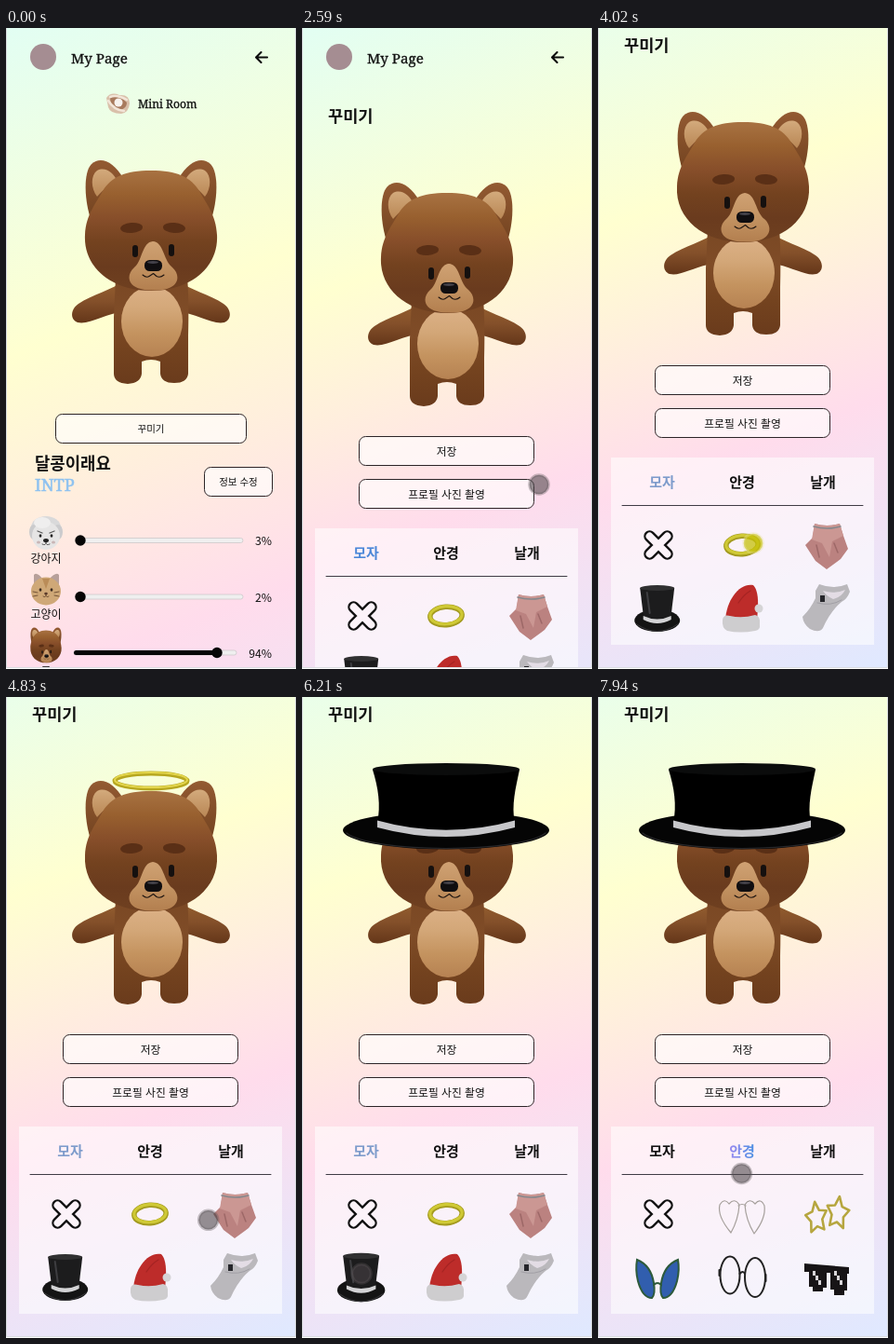
Animation of 312 by 688 pixels, one loop 8 s. Source, as an HTML page:

```html
<!DOCTYPE html>
<html lang="ko">
<head>
<meta charset="utf-8">
<title>My Page</title>
<style>
html, body { margin: 0; width: 100%; height: 100%; overflow: hidden; background: #fff; }
svg { display: block; }
text { font-family: 'Noto Sans CJK KR', 'Noto Sans CJK', 'Noto Sans KR', sans-serif; fill: #111; }
.slab { font-family: 'Noto Serif', serif; stroke: #111; stroke-width: .3; }
.slab.type { fill: #8ec2f0; stroke: #8ec2f0; stroke-width: .6; }
.mid { text-anchor: middle; }
.bold { font-weight: 700; }
.tab { font-weight: 700; text-anchor: middle; }
.btn { fill: #fff; fill-opacity: .65; stroke: #2c2427; }
.line { fill: none; stroke-linecap: round; stroke-linejoin: round; }
</style>
</head>
<body>
<svg id="stage" width="312" height="688" viewBox="0 0 312 688"></svg>
<script>
const LOOP = 8000;
const stage = document.getElementById('stage');

const txt = (x, y, size, s, cls = '', attrs = '') =>
  `<text x="${x}" y="${y}" font-size="${size}" class="${cls}" ${attrs}>${s}</text>`;
const path = (d, fill, attrs = '') => `<path d="${d}" fill="${fill}" ${attrs}/>`;
const line = (d, stroke, w, attrs = '') =>
  `<path class="line" d="${d}" stroke="${stroke}" stroke-width="${w}" ${attrs}/>`;
const oval = (x, y, rx, ry, fill, attrs = '') =>
  `<ellipse cx="${x}" cy="${y}" rx="${rx}" ry="${ry}" fill="${fill}" ${attrs}/>`;
const box = (x, y, w, h, r, attrs) =>
  `<rect x="${x}" y="${y}" width="${w}" height="${h}" rx="${r}" ${attrs}/>`;
const group = (x, y, body, id = '') => `<g ${id && `id="${id}"`} transform="translate(${x} ${y})">${body}</g>`;
const button = (x, y, w, h, s, size) =>
  box(x, y, w, h, 7, 'class="btn"') + txt(x + w / 2, y + h / 2 + size * .4, size, s, 'mid');

function gradient(id, stops, axis = 'x1="0" y1="0" x2="0" y2="1"') {
  const marks = stops.map((c, i) => `<stop offset="${i / (stops.length - 1)}" stop-color="${c}"/>`);
  return `<linearGradient id="${id}" ${axis}>${marks.join('')}</linearGradient>`;
}

// Page backdrop: the same four colours at 160 degrees, fitted to the page height.
function backdrop(id, h) {
  const a = Math.PI / 9, sx = Math.sin(a), sy = Math.cos(a), len = 312 * sx + h * sy;
  return gradient(id, ['#e2fef3', '#ffffd0', '#ffdcec', '#dfe9ff'],
    `gradientUnits="userSpaceOnUse" x1="0" y1="0" x2="${len * sx}" y2="${len * sy}"`);
}

const defs = `<defs>
  ${backdrop('bg1', 950)}${backdrop('bg2', 764)}
  ${gradient('head', ['#a87242', '#98602f', '#874e2a', '#73421f', '#6a3b1e', '#6f4020'])}
  ${gradient('ear', ['#935a32', '#71421f'])}
  ${gradient('inner', ['#d3aa7c', '#b98755'])}
  ${gradient('body', ['#7a4824', '#7f4c27', '#74431f', '#6a3b1c'])}
  ${gradient('arm', ['#96602f', '#84502a', '#643619'])}
  ${gradient('belly', ['#dcb187', '#d3a778', '#c4935f', '#b68252'])}
  ${gradient('muzzle', ['#cfa173', '#c39362', '#b37f4f'])}
  ${gradient('cloth', ['#efb0b0', '#e9a3a4', '#dc9193'])}
  ${gradient('back', ['#dc9292', '#cf8080', '#d58a8a'])}
  ${gradient('pick', ['#9b8af0', '#4a8fe2'], '')}
  <clipPath id="view"><rect x="1" width="310" height="686"/></clipPath>
</defs>`;

const mirror = body => `<g transform="translate(312 0) scale(-1 1)">${body}</g>`;

const earShape = path('M92 208C84 185 83 155 92 146C102 137 116 144 126 161L112 196Z', 'url(#ear)')
  + path('M98 181C91 172 91 158 98 153C107 148 116 156 119 163C111 168 104 174 98 181Z', 'url(#inner)');
const armShape = path('M128 270C114 282 92 286 78 296C69 302 69 313 77 316C90 319 106 306 130 304Z', 'url(#arm)');
const face = oval(135, 214.5, 12, 5.5, '#5a2f16', 'transform="rotate(-4 135 214)"')
  + oval(181, 214.5, 12, 5.5, '#5a2f16', 'transform="rotate(4 181 214)"')
  + path('M158 229C146 230 147 250 138 257C129 265 131 277 145 280C152 282 166 282 173 280C187 276 187 264 179 257C169 249 170 230 158 229Z', 'url(#muzzle)')
  + box(136, 233, 6, 13, 3, 'fill="#15100f"') + box(175, 232, 6, 13, 3, 'fill="#15100f"')
  + box(149, 249, 19, 12, 5.5, 'fill="#100e10"') + oval(158, 251.5, 6, 1.5, '#44424a')
  + line('M147 265Q151 268.500 154 266.500L158.500 263.500L162 266.500Q166 268.500 170 265', '#1d1410', 1.1);

const bear = armShape + mirror(armShape)
  + path('M118 268H195Q197 290 196 330V371Q195 381 181 381Q167 381 166 371V358Q156 354 146 358V371Q145 381 131 382Q116 381 116 371V310Z', 'url(#body)')
  + oval(157, 315, 33, 38, 'url(#belly)')
  + earShape + mirror(earShape)
  + path('M156 153C128 153 113 160 104 175C97 188 86 200 85 222C83 257 114 282 156 282C198 282 229 257 227 222C226 200 215 188 208 175C199 160 184 153 156 153Z', 'url(#head)')
  + face;

const scarfBack = path('M102 108L77 145Q58 166 50 185Q52 207 61 222Q66 238 66 250Q75 268 81 284Q92 297 108 306Q124 322 142 341Q150 322 176 306Q205 288 217 272Q226 285 238 286Q228 274 227 264Q242 252 249 238Q259 218 263 190Q256 166 240 146L210 108Z', 'url(#back)')
  + line('M66 168Q60 195 72 235M94 196Q82 235 92 285M246 172Q250 198 236 238M222 196Q229 230 215 262', '#bf7072', 2, 'opacity=".5"')
  + line('M79 155Q68 185 80 245M238 158Q243 190 230 225', '#eaa6a6', 4, 'opacity=".6"');
const scarfFront = path('M96 136C98 112 122 92 156 92C194 92 212 110 216 132C227 148 228 164 226 181C212 184 200 178 192 166C182 173 172 165 162 166C148 171 137 164 126 164C118 176 102 184 86 180C83 166 88 150 96 136Z', 'url(#cloth)')
  + line('M113 140Q105 160 96 176M129 146Q122 155 126 164M151 150V164M191 148Q184 158 192 166M207 142Q215 160 216 178', '#c87b7e', 1.6, 'opacity=".6"')
  + line('M120 112Q136 98 158 98M171 150V162M200 148Q202 163 208 174', '#f7c5c4', 3, 'opacity=".6"')
  + line('M92 129C100 150 214 150 223 127', '#8f9698', 9.5)
  + line('M92 127C100 147 214 147 223 125', '#c9cdcd', 3.8)
  + line('M92 131.500C100 152 214 152 223 130', '#b3b8b9', 1.8);

const bigHat = oval(155, 143, 111, 20.5, '#050505')
  + line('M48 146C75 168 235 168 262 146', '#27272a', 1.2)
  + path('M76 78C82 98 85 115 81 136Q155 162 229 136C225 115 230 98 234 78Z', '#000')
  + oval(155, 77.5, 79, 6.5, '#0b0c0c')
  + path('M81 132.500Q155 153 229 132.500V140Q155 160 81 140Z', '#c7c7ca');

const halo = oval(156, 90, 39, 8, 'none', 'stroke="#b7a71f" stroke-width="5"')
  + oval(156, 89, 39, 8, 'none', 'stroke="#e4d64d" stroke-width="2"');

const header = `<circle cx="40" cy="31" r="14" fill="#a58d92"/>` + txt(70, 38, 15.2, 'My Page', 'slab')
  + line('M281 31.500H270M274.500 26L269 31.500L274.500 37', '#0c0c0c', 2.1);

const shell = path('M108 75Q113 68 122 72Q133 71 133 81Q132 91 124 92Q112 92 110 85Z', '#d9c0aa')
  + path('M112 74Q122 72 130 80Q130 86 123 88Q112 86 112 74Z', '#a87a5d')
  + line('M110 78Q116 88 127 89M112 74Q119 71 130 77', '#f2e5d8', 2.5)
  + oval(121, 80, 4.5, 4.5, '#f7f2ee');

const miniEyes = (y, c) => oval(37, y, 1.4, 1.8, c) + oval(49, y, 1.4, 1.8, c);
const dog = oval(43, 536, 16, 12, '#d9d9da') + oval(30, 541, 5, 8, '#cbcbcd') + oval(56, 541, 5, 8, '#cbcbcd')
  + oval(43, 545, 15, 15, '#e6e5e5') + oval(39, 531, 9, 6, '#efeeee')
  + miniEyes(545, '#222') + line('M34 540L39 542M52 540L47 542', '#555', 1.3)
  + oval(43, 550, 3, 2, '#222') + line('M39 554Q43 556 43 552Q43 556 47 554', '#555', 1)
  + oval(35, 552, 2, 1.5, '#c9b5b5') + oval(51, 552, 2, 1.5, '#c9b5b5');
const cat = path('M30 602V587Q33 583 40 592H46Q54 583 57 587V602Z', '#b7a09a')
  + oval(43, 604.5, 16, 15, '#cfa877') + path('M39 591H47L43 602Z', '#ba8c58')
  + miniEyes(603, '#3a2a20') + oval(43, 607, 1.8, 1.2, '#5a3a2a')
  + line('M29 605L34 606M29 610L34 609M57 605L52 606M57 610L52 609M40 610Q43 612 43 608Q43 612 46 610', '#6a4a30', .9);
const cub = group(43, 663, `<g transform="scale(.235 .27) translate(-156 -214)">${earShape}${mirror(earShape)}
  ${path('M156 153C100 153 85 200 85 222C83 257 114 282 156 282C198 282 229 257 227 222C226 200 212 153 156 153Z', 'url(#head)')}${face}</g>`);

function slider(x0, x1, y, knob, label) {
  return box(x0, y - 2.5, x1 - x0, 5, 2.5, 'fill="#efefef" stroke="#c9c4c6" stroke-width=".7"')
    + box(x0, y - 2.5, knob - x0, 5, 2.5, 'fill="#060606"')
    + `<circle cx="${knob}" cy="${y}" r="5.700" fill="#060606"/>`
    + txt(286, y + 5, 12.2, label, '', 'text-anchor="end"');
}

const home = box(0, 0, 312, 950, 0, 'fill="url(#bg1)"') + header + shell
  + txt(142, 86, 12.1, 'Mini Room', 'slab') + bear
  + oval(176, 374, 10, 7.5, '#444146', 'id="foot"')
  + button(53.5, 414.5, 205, 31, '꾸미기', 10.5)
  + txt(31, 474, 17.8, '달콩이래요', 'bold')
  + txt(31, 497, 18.2, 'INTP', 'slab type')
  + button(213.5, 471.5, 73, 31, '정보 수정', 10.5)
  + dog + cat + cub
  + [['강아지', 574], ['고양이', 634], ['곰', 695]].map(([s, y]) => txt(43, y, 12, s, 'mid')).join('')
  + slider(75, 255, 550, 80, '3%') + slider(75, 255, 610.5, 80, '2%') + slider(73, 248, 670.5, 227, '94%');

// Shop icons, each drawn around its own centre.
const cross = line('M-9.500 -9.500L9.500 9.500M9.500 -9.500L-9.500 9.500', '#111', 12.5)
  + line('M-9.500 -9.500L9.500 9.500M9.500 -9.500L-9.500 9.500', '#fcf3f9', 7.8);
const ring = `<g transform="rotate(-4)">${oval(0, 0, 17.2, 9.8, 'none', 'stroke="#a39a1f" stroke-width="5.500"')
  + oval(0, -.8, 17.2, 9.6, 'none', 'stroke="#cfc935" stroke-width="3.200"')}</g>`;
const scarf = path('M-13 -23Q0 -19 14 -23L18 -10L23 4L15 15L0 26L-12 17L-23 0L-15 -8Z', '#bb8280')
  + path('M-13 -23Q0 -19 14 -23L18 -10L6 -4L3 13L-5 -2L-16 -6Z', '#cb9793')
  + line('M-11 0L-8 13M8 -2L12 8', '#9d6867', 1.5)
  + line('M-14 -20Q0 -16 15 -20', '#85878b', 1.6);
const hat = oval(0, 13, 24.5, 12, '#141414') + line('M-22 17Q0 32 22 17', '#39393b', 1)
  + path('M-18.500 -22L-14.500 11Q0 18 14.500 11L18.500 -22Z', '#1c1c1d')
  + oval(0, -22, 18.5, 3, '#303031') + path('M-15 8Q0 15 15 8V12Q0 20 -15 12Z', '#d3d3d5')
  + line('M-11 -17L-8 5', '#3d3d40', 2);
const santa = path('M-18 13C-17 -10 -2 -28 12 -25Q18 -19 17 0L16 14Z', '#bd2c2a')
  + line('M-4 -6Q2 -15 9 -19', '#a52423', 1.2)
  + path('M-21 12Q-20 6 -13 8Q0 11 14 7Q20 8 19 17Q20 23 14 24Q-2 27 -16 24Q-22 21 -21 12Z', '#cecdcf')
  + `<circle cx="18" cy="0" r="4.500" fill="#d5d4d6"/>`;
const visor = path('M-12 -19L-8 -26Q8 -20 22 -26L25 -18Q22 -10 16 -7Q4 3 -4 21Q-8 27 -18 22Q-25 17 -26 9Q-17 0 -12 -11Z', '#bab8bc')
  + path('M-4 -19Q8 -15 20 -20Q16 -12 7 -10Q0 -13 -4 -19Z', '#e3dce5')
  + line('M-10 -6Q4 -2 16 -9', '#a19fa5', 1)
  + box(-7, -14, 5, 7, 0, 'fill="#26262b"');
const hearts = line('M-3 -10Q-8 -18 -14 -11Q-19 -18 -24 -10Q-27 2 -12 20Q-4 6 -3 -10ZM3 -10Q8 -18 14 -11Q20 -18 24 -9Q26 4 13 21Q4 6 3 -10ZM-4 -9Q0 -12 4 -9', '#a6a09c', 1.2);
const starPoints = (cx, cy, r, turn) => 'M' + Array.from({ length: 10 }, (_, i) => {
  const a = turn + i * Math.PI / 5 - Math.PI / 2, q = i % 2 ? r * .53 : r;
  return `${(cx + q * Math.cos(a)).toFixed(1)} ${(cy + q * Math.sin(a) * 1.45).toFixed(1)}`;
}).join('L') + 'Z';
const stars = line(starPoints(-11, 4, 12, -.15), '#b6a63f', 2.6) + line(starPoints(12, -1, 12.5, .15), '#b6a63f', 2.6);
const wing = 'M-22 -19Q-7 -13 -4 6Q-2 18 -6 22Q-16 22 -21 4Q-24 -8 -22 -19Z';
const wings = `<g stroke="#2d5a3b" stroke-width="2">${path(wing, '#315eae') + path(wing, '#315eae', 'transform="scale(-1 1)"')}</g>`
  + line('M-4 8Q0 4 4 8', '#2d5a3b', 1.8);
const rounds = oval(-13, -2.5, 10.5, 20, 'none', 'stroke="#222" stroke-width="2"')
  + oval(14, 0, 11, 21, 'none', 'stroke="#222" stroke-width="2"')
  + line('M-2.500 -4Q1 -8 3 -4M-24.500 -8V-2M25.500 -3V4', '#222', 2);
const blocks = path('M-24 -15L24 -11V-4H22V14H19V19H8V13H4V-5H0V11H-4V15H-15V10H-19V-6H-24Z', '#171416')
  + [-15, 8].map(x => [0, 1, 2].map(i => box(x + i * 3, -7 + i * 5, 3, 5, 0, 'fill="#d8d5d8"')).join('')).join('');

const cols = [65, 155, 246], rows = [631, 699];
const grid = icons => icons.map((s, i) => group(cols[i % 3], rows[i / 3 | 0], s)).join('');
const hats = grid([cross, ring, scarf, `<g id="hatIcon">${group(-1.3, 0, hat)}</g>`, santa, visor]);
const glasses = grid([cross, hearts, stars, group(-1, 0, wings), rounds, blocks]);

const shop = box(0, 0, 312, 764, 0, 'fill="url(#bg2)"') + header
  + txt(28, 100.5, 17.6, '꾸미기', 'bold')
  + `<g transform="translate(0 24)">
      ${group(0, 52, scarfBack, 'scarfBack')}${bear}
      ${group(0, 52, scarfFront, 'scarfFront')}${group(0, 52, bigHat, 'bigHat')}${group(0, 52, halo, 'halo')}
    </g>`
  + button(61.5, 438.5, 188, 31, '저장', 11.8) + button(61.5, 484.5, 188, 31, '프로필 사진 촬영', 11.8)
  + box(14, 537, 283, 201, 0, 'fill="#fff" fill-opacity=".58"')
  + txt(69, 569, 15, '모자', 'tab', 'id="tabHat"') + txt(155, 569, 15, '안경', 'tab', 'id="tabGlass"')
  + txt(242, 569, 15, '날개', 'tab')
  + line('M26 588.500H285', '#3f3c45', 1)
  + `<g id="hats">${hats}</g><g id="glasses">${glasses}</g>`;

stage.innerHTML = defs + `<g clip-path="url(#view)"><g id="home">${home}</g><g id="shop">${shop}</g>
  <g id="cursor"><circle r="10.300" fill="#4a4346" fill-opacity=".58" stroke="#5b5558" stroke-opacity=".35" stroke-width="3"/></g></g>
  <path d="M.5 0V686.500H311.500V0" fill="none" stroke="#d9dce0"/>`;

const el = {};
stage.querySelectorAll('[id]').forEach(n => el[n.id] = n);
const dot = el.cursor.firstElementChild;
const show = (id, on) => el[id].setAttribute('visibility', on ? 'inherit' : 'hidden');
const move = (id, x, y) => el[id].setAttribute('transform', `translate(${x} ${y})`);
const clamp = v => Math.min(1, Math.max(0, v));
const smooth = v => v * v * (3 - 2 * v);

// Pointer stops: time, x, y.
const stops = [
  [330, 300, 702], [930, 175, 380], [1390, 175, 380], [1510, 180, 433], [1700, 180, 433],
  [2190, 183, 325], [2250, 183, 325], [2590, 255, 490], [2850, 295, 522], [3080, 294, 540],
  [3820, 167, 553], [4090, 167, 553], [4360, 170, 572], [4560, 170, 572], [4980, 237, 557],
  [5390, 237, 557], [5810, 64, 619], [6750, 64, 619], [6880, 127.5, 495.5], [7220, 163, 487],
  [7480, 163, 487], [7700, 154.5, 511.5], [LOOP, 154.5, 511.5]
];

function pointer(t) {
  const i = stops.findIndex(s => s[0] > t);
  if (i < 1) return stops[0].slice(1);
  const [t0, x0, y0] = stops[i - 1], [t1, x1, y1] = stops[i];
  const k = smooth((t - t0) / (t1 - t0));
  return [x0 + (x1 - x0) * k, y0 + (y1 - y0) * k];
}

function draw(t) {
  const inShop = t >= 1660, onGlasses = t >= 7600;
  const scarfOn = t >= 5060 && t < 6140;
  show('home', !inShop);
  show('shop', inShop);
  show('foot', !inShop && t >= 1390);
  move('shop', 0, -76 * (1 - (1 - clamp((t - 2660) / 480)) ** 3));

  show('halo', inShop && t >= 4160 && t < 5060);
  show('scarfBack', scarfOn);
  show('scarfFront', scarfOn);
  show('bigHat', t >= 6140);
  show('hats', inShop && !onGlasses);
  show('glasses', onGlasses);
  const hover = t >= 6010 && t < 6950 ? 1.05 : 1;
  el.hatIcon.setAttribute('transform', `scale(${hover})`);
  el.tabHat.style.fill = onGlasses ? '#111' : t < 2660 ? '#4b87d8' : '#7d9bcb';
  el.tabGlass.style.fill = onGlasses ? 'url(#pick)' : '#111';

  const lit = t >= 3860 && t < 4360;
  dot.setAttribute('fill', lit ? '#c4bf08' : '#4a4346');
  dot.setAttribute('fill-opacity', lit ? .75 : .58);
  dot.setAttribute('stroke', lit ? '#e8e3a0' : '#5b5558');
  show('cursor', t >= 330);
  move('cursor', ...pointer(t));
}

const start = performance.now();
function tick() {
  draw((performance.now() - start) % LOOP);
  requestAnimationFrame(tick);
}
tick();
</script>
</body>
</html>
```
